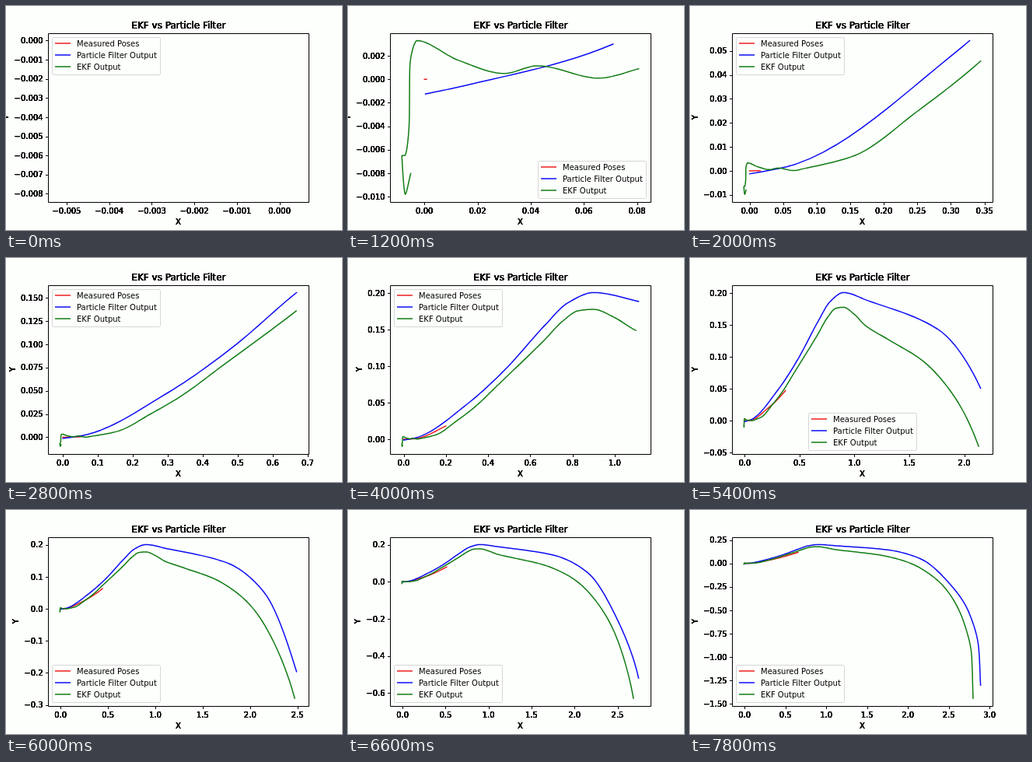
Animation, 432 px wide and 288 px high, one loop 8 s. Source, as an HTML page with a canvas:

```html
<!DOCTYPE html>
<html lang="en">
<head>
<meta charset="utf-8">
<title>EKF vs Particle Filter</title>
<style>
  html, body { margin: 0; width: 100%; height: 100%; overflow: hidden; background: #fdfffc; }
  canvas { display: block; }
</style>
</head>
<body>
<canvas id="plot" width="432" height="288"></canvas>
<script>
const ctx = document.getElementById('plot').getContext('2d');
const PAPER = '#fdfffc';
const STEP_MS = 200, STEPS = 40;
const AXES = { left: 54, right: 388.8, top: 34.56, bottom: 252 };
const LEGEND = { w: 139.4, h: 48, pad: 5 };
// Candidate legend spots in order of preference, as fractions of the free space.
const SPOTS = [[1, 0], [0, 0], [0, 1], [1, 1], [1, .5], [0, .5], [.5, 1], [.5, 0], [.5, .5]];

// Waypoints are [x, y, step]; where a step is given, the line arrives then.
const allSeries = [
  makeSeries('Measured Poses', '#ee1c1c', [
    [0, 0, 0], [.0008, 0, 6], [.05, .0005, 14], [.2, .018, 20], [.37, .047], [.655, .117, 39]
  ]),
  makeSeries('Particle Filter Output', '#0c0cf4', [
    [.0004, -.00125, 0], [.016, -.0005, 3], [.071, .003, 6], [.3, .0478], [.482, .0957],
    [.668, .1555, 14], [.78, .187], [.9, .2007], [1.113, .1886, 20], [1.756, .1437],
    [2.149, .051, 27], [2.482, -.188], [2.745, -.519, 33], [2.867, -.902], [2.89, -1.3, 39]
  ]),
  makeSeries('EKF Output', '#107c14', [
    [-.00516, -.00803, 0], [-.0072, -.0098], [-.0085, -.0065], [-.0074, -.0065],
    [-.0057, -.0035], [-.0055, .001], [-.0028, .0033, 3], [.013, .0016], [.03, .0005],
    [.0426, .00115], [.0655, .0001], [.0806, .0009, 6], [.156, .0063], [.249, .0246],
    [.34, .0447], [.449, .0748], [.667, .1357, 14], [.75, .1607], [.83, .176], [.9, .1777],
    [.996, .167], [1.1, .149, 20], [1.324, .1256], [1.63, .0927], [1.91, .0378],
    [2.131, -.04, 27], [2.46, -.268], [2.685, -.628, 33], [2.781, -.99], [2.798, -1.44, 39]
  ])
];

// Cubic through the given values that never overshoots them.
function smoothCurve(knots, values) {
  const last = knots.length - 1;
  const rate = i => (values[i + 1] - values[i]) / (knots[i + 1] - knots[i]);
  const slopes = knots.map((_, i) => {
    if (i === 0) return rate(0);
    if (i === last) return rate(last - 1);
    const a = rate(i - 1), b = rate(i);
    return a * b > 0 ? 2 * a * b / (a + b) : 0;
  });
  return at => {
    const i = Math.max(0, knots.findIndex(k => k >= at) - 1);
    const h = knots[i + 1] - knots[i], t = (at - knots[i]) / h, u = 1 - t;
    return values[i] * u * u * (1 + 2 * t) + values[i + 1] * t * t * (3 - 2 * t)
      + h * t * u * (slopes[i] * u - slopes[i + 1] * t);
  };
}

function makeSeries(label, color, way) {
  let sum = 0;
  const dist = way.map(([x, y], i) =>
    sum += i ? Math.hypot(x - way[i - 1][0], y - way[i - 1][1]) : 0);
  const timed = way.map((p, i) => i).filter(i => way[i].length > 2);
  const travelled = smoothCurve(timed.map(i => way[i][2]), timed.map(i => dist[i]));
  const x = smoothCurve(dist, way.map(p => p[0]));
  const y = smoothCurve(dist, way.map(p => p[1]));

  // The path grows by equal shares of each gap between waypoints.
  const marks = dist.slice(0, -1).flatMap((d, i) =>
    Array.from({ length: 12 }, (_, k) => d + (dist[i + 1] - d) * k / 12));
  const pathUntil = step => {
    const end = Math.min(travelled(step), sum);
    return [...marks.filter(m => m < end), end].map(m => ({ x: x(m), y: y(m) }));
  };
  return { label, color, pathUntil };
}

// View range with 5% margins, and round tick values inside it.
function makeScale(values, from, to) {
  const min = Math.min(...values), max = Math.max(...values), margin = (max - min) * .05;
  const lo = min - margin, hi = max + margin, raw = (hi - lo) / 9;
  const power = 10 ** Math.floor(Math.log10(raw));
  const step = power * [1, 2, 2.5, 5, 10].find(m => m * power >= raw);
  let digits = 0;
  while (Math.abs(step * 10 ** digits - Math.round(step * 10 ** digits)) > 1e-6) digits++;
  const ticks = [];
  for (let k = Math.ceil(lo / step); k * step <= hi; k++) {
    ticks.push({ value: k * step, text: (k * step).toFixed(digits).replace('-', '\u2212') });
  }
  return { ticks, map: v => from + (v - lo) / (hi - lo) * (to - from) };
}

function write(text, x, y, align, size = 10, passes = 8) {
  ctx.font = `${size}px "DejaVu Sans", sans-serif`;
  ctx.textAlign = align;
  ctx.fillStyle = '#000';
  // Repeated passes give the heavier, overprinted look.
  for (let i = 0; i < passes; i++) ctx.fillText(text, x, y);
}

function stroke(points, color, width) {
  ctx.beginPath();
  points.forEach(([x, y]) => ctx.lineTo(x, y));
  ctx.strokeStyle = color;
  ctx.lineWidth = width;
  ctx.stroke();
}

function drawAxes(xs, ys) {
  ctx.lineCap = 'butt';
  ctx.strokeStyle = '#000';
  ctx.lineWidth = 1;
  ctx.strokeRect(54.5, 35.5, 335, 217);
  for (const { value, text } of xs.ticks) {
    const x = xs.map(value), line = Math.round(x) + .5;
    stroke([[line, 253], [line, 256]], '#000', 1);
    write(text, x, 267, 'center');
  }
  let labelWidth = 0;
  for (const { value, text } of ys.ticks) {
    const y = ys.map(value), line = Math.round(y) + .5;
    stroke([[51, line], [54, line]], '#000', 1);
    write(text, 47.6, Math.round(y + 3.7), 'right');
    labelWidth = Math.max(labelWidth, ctx.measureText(text).width);
  }
  write('EKF vs Particle Filter', 222, 29, 'center', 12);
  write('X', 221.4, 281, 'center');
  ctx.save();
  ctx.translate(Math.round(40.5 - labelWidth), 143.3);
  ctx.rotate(-Math.PI / 2);
  write('Y', 0, 0, 'center');
  ctx.restore();
}

// The spot that covers the fewest points of the lines.
function bestSpot(points) {
  const freeX = AXES.right - AXES.left - 2 * LEGEND.pad - LEGEND.w;
  const freeY = AXES.bottom - AXES.top - 2 * LEGEND.pad - LEGEND.h;
  let best;
  for (const [fx, fy] of SPOTS) {
    const x = AXES.left + LEGEND.pad + fx * freeX, y = AXES.top + LEGEND.pad + fy * freeY;
    const hits = points.filter(([px, py]) =>
      px > x && px < x + LEGEND.w && py > y && py < y + LEGEND.h).length;
    if (!best || hits < best.hits) best = { x: Math.round(x), y: Math.round(y), hits };
  }
  return best;
}

function drawLegend({ x, y }) {
  ctx.beginPath();
  ctx.roundRect(x + .5, y + .5, 139, 48, 2);
  ctx.globalAlpha = .8;
  ctx.fillStyle = PAPER;
  ctx.fill();
  ctx.strokeStyle = '#ccc';
  ctx.lineWidth = 1;
  ctx.stroke();
  ctx.globalAlpha = 1;
  allSeries.forEach(({ label, color }, i) => {
    const row = y + 8 + 15 * i;
    stroke([[x + 4, row], [x + 24, row]], color, 1.5);
    write(label, x + 32, row + 4, 'left', 10, 1);
  });
}

function draw(step) {
  const paths = allSeries.map(series => series.pathUntil(step));
  const all = paths.flat();
  const xs = makeScale(all.map(p => p.x), AXES.left, AXES.right);
  const ys = makeScale(all.map(p => p.y), AXES.bottom, AXES.top);
  const lines = paths.map(path => path.map(p => [xs.map(p.x), ys.map(p.y)]));

  ctx.fillStyle = PAPER;
  ctx.fillRect(0, 0, 432, 288);
  ctx.lineJoin = 'round';
  ctx.lineCap = 'square';
  lines.forEach((line, i) => {
    if (line.length > 1) stroke(line, allSeries[i].color, 1.5);
  });
  drawAxes(xs, ys);
  drawLegend(bestSpot(lines.flat()));
}

const start = performance.now();
let shown = -1;
function tick() {
  const step = Math.floor((performance.now() - start) / STEP_MS) % STEPS;
  if (step !== shown) draw(shown = step);
  requestAnimationFrame(tick);
}
tick();
</script>
</body>
</html>
```
